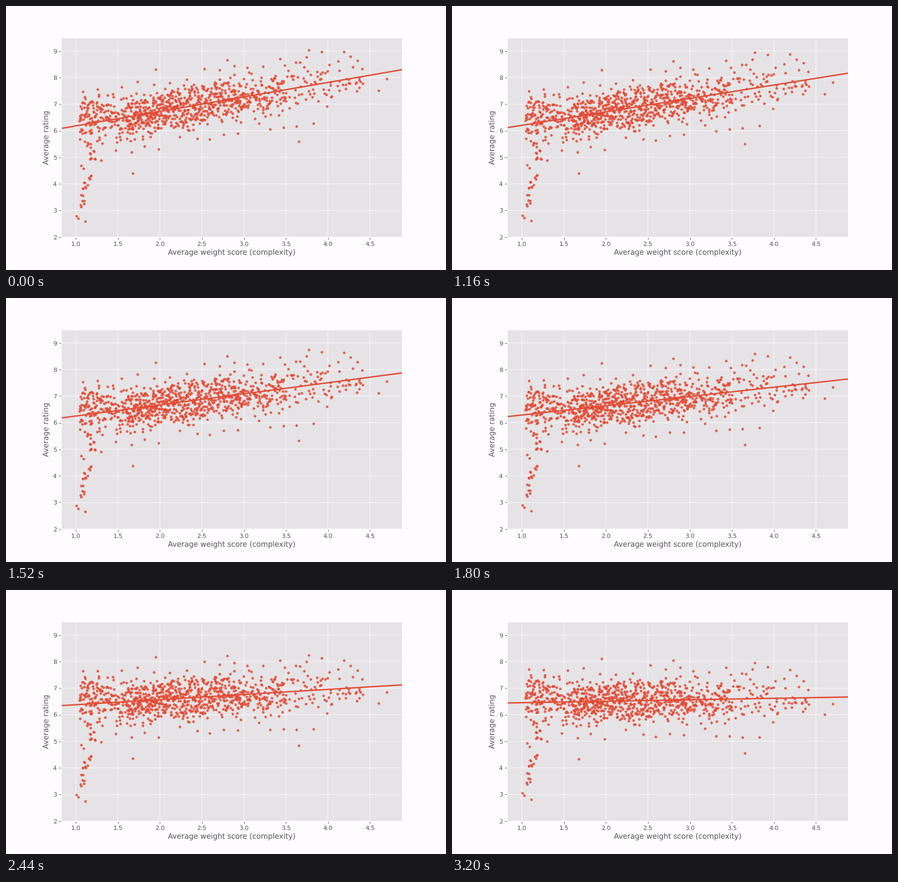
These frames come from a looping animation (750x450 px, 4.04 s). A matplotlib script:

```python
import numpy as np
import matplotlib.pyplot as plt
from matplotlib.animation import FuncAnimation

W, H, DPI = 750, 450, 75
FRAMES, STEP = 101, 40
HOLD, MOVE = 25, 50            # frames at rest, frames in motion

RED, GREY = "#E24A33", "#555555"
PAGE, PANEL = "#FEFCFF", "#E5E3E5"

XLIM, YLIM = (0.8235, 4.8815), (2.0, 9.5)
LINE_A = np.array([6.085, 8.295])   # fit line at both x limits, start
LINE_B = np.array([6.441, 6.665])   # and end

# Loneliest points, which set the outline of the cloud
EXTREMES = [
    (1.01, 2.80), (1.03, 2.71), (1.11, 2.60), (1.68, 4.40), (3.65, 5.59),
    (1.95, 8.31), (2.80, 8.66), (3.77, 9.03), (4.19, 8.98), (4.27, 8.80),
    (4.35, 8.65), (4.60, 7.51), (4.70, 7.95),
]

rng = np.random.default_rng(7)


def level(x):
    """First fit line at x."""
    return np.interp(x, XLIM, LINE_A)


def body(n):
    """Evenly spread normal scatter, densest around x = 2.3."""
    share = [0, 0.09, 0.17, 0.38, 0.62, 0.82, 0.945, 1]
    edges = [1.04, 1.3, 1.6, 2.0, 2.5, 3.0, 3.5, 4.05]
    x = np.interp((np.arange(n) + rng.random(n)) / n, share, edges)
    e = rng.normal(0, 1, n)
    e = np.where(np.abs(e) > 2.3, e / 2, e)
    near = np.clip((1.6 - x) / 0.5, 0, 1)
    return x, level(x) + 0.3 * near + (0.41 + 0.06 * near) * e


def tail(n):
    """Low ratings that fan out upwards from the simplest entries."""
    y = 6.0 - 2.9 * rng.random(n) ** 1.6
    return 1.05 + 0.27 * rng.random(n) * (y - 2.4) / 3.6, y


def far_end(n):
    """Loose group at the complex end."""
    x = rng.uniform(4.0, 4.45, n)
    return x, level(x) + rng.normal(-0.15, 0.4, n)


def strays(n):
    """Single points just above and below the cloud."""
    x = np.linspace(1.3, 3.95, n) + rng.uniform(-0.05, 0.05, n)
    side = np.where(np.arange(n) % 2, 1, -1.1)
    return x, level(x) + side * rng.uniform(0.95, 1.35, n)


groups = [body(905), tail(42), far_end(24), strays(30), np.transpose(EXTREMES)]
xs, ys = np.concatenate(groups, axis=1)
drop = np.interp(xs, XLIM, LINE_A - LINE_B)

plt.rcParams.update({"font.family": "DejaVu Sans", "text.hinting": "none"})
fig = plt.figure(figsize=(W / DPI, H / DPI), dpi=DPI, facecolor=PAGE)
ax = fig.add_axes([0.125, 0.125, 0.775, 0.755], facecolor=PANEL)
ax.set_axisbelow(True)
ax.grid(color=PAGE, lw=0.8, snap=False)
for spine in ax.spines.values():
    spine.set(color=PAGE, lw=1)
ax.set_xticks(np.arange(1, 5, 0.5))
ax.set_yticks(range(2, 10))
ax.tick_params(color=GREY, labelcolor=GREY, labelsize=10)
ax.set_xlabel("Average weight score (complexity)", size=12, color=GREY)
ax.set_ylabel("Average rating", size=12, color=GREY)

dots = ax.scatter(xs, ys, s=10, c=RED, alpha=0.8, linewidths=1.125)
fit, = ax.plot(XLIM, LINE_A, color=RED, lw=2.25)
ax.set(xlim=XLIM, ylim=YLIM)


def draw(i):
    p = min(max((i - HOLD) / MOVE, 0), 1)
    dots.set_offsets(np.column_stack([xs, ys - p * drop]))
    fit.set_ydata(LINE_A + p * (LINE_B - LINE_A))
    return dots, fit


anim = FuncAnimation(fig, draw, frames=FRAMES, interval=STEP, repeat=True)
plt.show()
```
